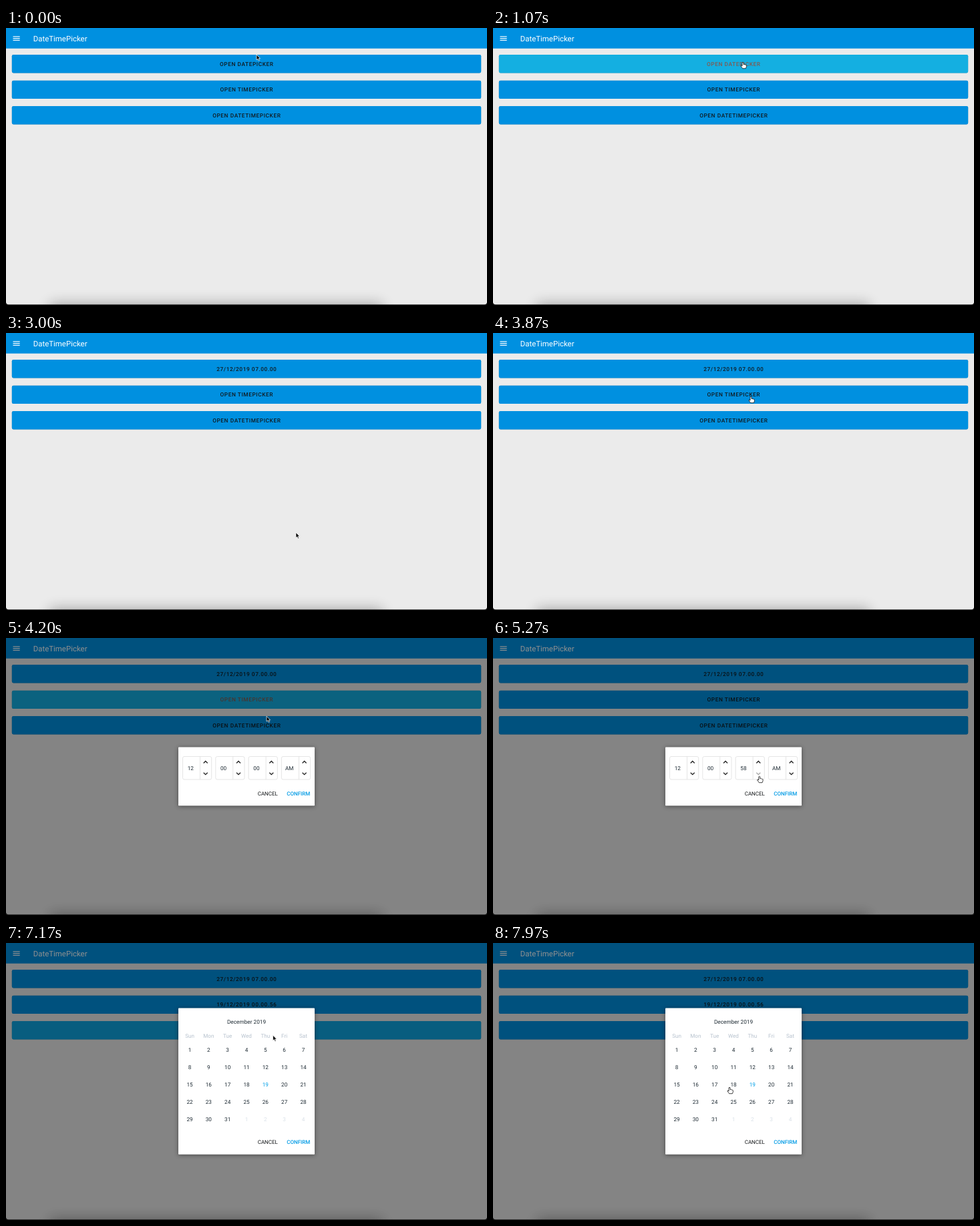
An HTML page for the animation above (8000 ms loop, 720x415 px).

```html
<!DOCTYPE html>
<html lang="en">
<head>
<meta charset="utf-8">
<title>DateTimePicker</title>
<style>
  html, body { margin: 0; width: 100%; height: 100%; overflow: hidden; background: #ebebeb; }
  svg { display: block; width: 100%; height: 100%; }
  text { font-family: Roboto, "Open Sans", sans-serif; text-rendering: geometricPrecision; }
  .raised { filter: drop-shadow(0 .5px .7px rgba(0, 0, 0, .28)); }
  .card { filter: drop-shadow(0 1.5px 3px rgba(0, 0, 0, .45)); }
</style>
</head>
<body>
<svg id="stage" viewBox="0 0 720 415" xmlns="http://www.w3.org/2000/svg">
  <defs><filter id="soft" x="-10%" y="-200%" width="120%" height="500%"><feGaussianBlur stdDeviation="10"/></filter></defs>
</svg>
<script>
const LOOP = 8000;
const BLUE = '#0090e0', INK = '#1d2a33';
const stage = document.getElementById('stage');

function add(parent, tag, attrs) {
  const el = document.createElementNS(stage.namespaceURI, tag);
  for (const key in attrs) el.setAttribute(key, attrs[key]);
  return parent.appendChild(el);
}
const rect = (parent, x, y, width, height, fill, more) =>
  add(parent, 'rect', { x, y, width, height, fill, ...more });

// Text placed by the middle of its capitals.
function label(parent, str, x, y, size, fill, more) {
  const el = add(parent, 'text', {
    x, y: y + size * .355, 'font-size': size, fill, 'text-anchor': 'middle', ...more });
  el.textContent = str;
  return el;
}

// Page
rect(stage, 0, 0, 720, 415, '#ebebeb');
rect(stage, 0, 0, 720, 30.7, BLUE);
for (const y of [12.3, 15.05, 17.8]) rect(stage, 10.5, y, 10.2, 1.15, '#fff');
label(stage, 'DateTimePicker', 40.7, 15.5, 11.45, '#fff', { 'text-anchor': 'start' });

const buttons = [40, 78.7, 117].map(y => {
  const box = rect(stage, 8.8, y, 702.4, 27.4, BLUE, { rx: 2.3, class: 'raised' });
  const text = label(stage, '', 360.3, y + 13.8, 8.3, '#101a20',
    { 'font-weight': 500, 'letter-spacing': .57 });
  return { y, box, text };
});
rect(stage, 66, 413, 497, 26, '#000', { filter: 'url(#soft)', opacity: .3 });
const shade = rect(stage, 0, 0, 720, 415, '#000', { opacity: .44 });
add(stage, 'path', { d: 'M0 410.5Q0 414.2 4 414.2H716Q720 414.2 720 410.5V415H0Z', fill: '#111' });

function dialog(y, height, actionsY) {
  const g = add(stage, 'g', {});
  rect(g, 258, y, 204, height, '#fff', { rx: .8, class: 'card' });
  label(g, 'CANCEL', 391.8, actionsY, 8, '#15181a');
  label(g, 'CONFIRM', 437.8, actionsY, 8, '#009be5', { 'font-weight': 500 });
  return g;
}

// Calendar
const colX = i => 275 + 28.33 * i, rowY = i => 160 + 26 * i;
const calendar = dialog(97.6, 219.2, 298.5);
label(calendar, 'December 2019', 360, 118.5, 8.25, INK);
'Sun Mon Tue Wed Thu Fri Sat'.split(' ').forEach((day, i) =>
  label(calendar, day, colX(i), 139.2, 8.1, '#b6c1cd'));
const picked = add(calendar, 'circle', { cx: colX(5), cy: rowY(3), r: 9, fill: '#00adf5' });
const days = [];
for (let i = 0; i < 35; i++) {
  const fill = i > 30 ? '#d9e1e8' : i === 18 ? '#009fe8' : INK;
  days.push(label(calendar, i % 31 + 1, colX(i % 7), rowY(Math.floor(i / 7)), 8.2, fill));
}

// Clock
const clock = dialog(163.5, 87.7, 233);
const fields = ['12', '00', '00', 'AM'].map((value, i) => {
  const x = 264.5 + 49.3 * i, mid = x + 34.2;
  rect(clock, x, 177.5, 43.2, 34.5, '#fff', { rx: 2.5, stroke: '#dfdfdf', 'stroke-width': .8 });
  rect(clock, x + 25.6, 177.5, .8, 34.5, '#dfdfdf');
  const chevron = (y, dy) => add(clock, 'path', {
    d: `M${mid - 3} ${y - dy}L${mid} ${y + dy}L${mid + 3} ${y - dy}`,
    fill: 'none', stroke: '#222', 'stroke-width': 1.3 });
  chevron(186, -1.5);
  return { text: label(clock, value, x + 11.8, 195, 8.2, INK), down: chevron(203.2, 1.5) };
});

// Pointers, with the tip at the origin
const arrow = add(stage, 'path', {
  d: 'M0 0V7.8L1.8 6.2L3.1 9.1L4.5 8.5L3.2 5.7H5.6Z',
  fill: '#000', stroke: '#fff', 'stroke-width': .7 });
const hand = add(stage, 'path', {
  d: 'M-1 .8Q0-.5 1 .8V3.7Q2 3 2.7 3.9Q3.7 3.4 4.1 4.3Q5.3 4 5.3 5.2V7.2L4.3 9.7H-.4L-3 6Q-3 4.5-1.9 5L-1 6Z',
  fill: '#fff', stroke: '#111', 'stroke-width': .8, 'stroke-linejoin': 'round' });

// Timeline: pointer stops and waypoints as time, x, y
const PATH = [
  [0, 375, 40], [350, 374, 51], [1080, 374, 51], [1870, 416.5, 268], [2080, 417, 240],
  [2240, 417, 240], [2560, 434, 299], [3030, 434, 299], [3330, 388, 108], [3550, 386, 95],
  [4060, 386, 95], [4200, 390, 117], [4620, 398.7, 207], [5780, 398.7, 207], [6050, 434, 234],
  [6240, 434, 234], [6730, 401.7, 139], [6850, 401, 136], [7080, 401, 136],
  [7970, 354, 216], [8000, 354, 216]
];
const DIALOGS = [[1130, 2720, calendar], [4200, 6200, clock], [7080, LOOP, calendar]];
const PRESSES = [960, 4030, 6910];
const STEPS_DOWN = [4980, 5240, 5470, 5700];
const PICK = 2200;

const clamp = v => Math.min(1, Math.max(0, v));
const mix = (a, b, k) => a + (b - a) * k;
const blend = (a, b, k) => `rgb(${a.map((v, i) => Math.round(mix(v, b[i], k)))})`;

// Speed at a waypoint: zero beside a rest, otherwise the mean over both sides.
function speed(i, axis) {
  const a = PATH[i - 1], p = PATH[i], b = PATH[i + 1];
  const rests = q => !q || (q[1] === p[1] && q[2] === p[2]);
  return rests(a) || rests(b) || (p[axis] - a[axis]) * (b[axis] - p[axis]) <= 0
    ? 0 : (b[axis] - a[axis]) / (b[0] - a[0]);
}

function pointerAt(t) {
  const j = PATH.findIndex(p => p[0] > t), i = j - 1;
  const span = PATH[j][0] - PATH[i][0], k = (t - PATH[i][0]) / span;
  return [1, 2].map(axis =>
    mix(PATH[i][axis], PATH[j][axis], k * k * (3 - 2 * k)) +
    span * k * (1 - k) * ((1 - k) * speed(i, axis) - k * speed(j, axis)));
}

function clickable(x, y, open) {
  if (!open) return buttons.some(b => y > b.y + .5 && y < b.y + 27.4);
  const actionY = open === calendar ? 298.5 : 233;
  if (Math.abs(y - actionY) < 9 && x > 372 && x < 460) return true;
  if (open === clock) return y > 177 && y < 212 && fields.some((f, i) => Math.abs(x - 298.7 - 49.3 * i) < 9);
  const col = Math.round((x - 275) / 28.33), row = Math.round((y - 160) / 26);
  return col >= 0 && col < 7 && row >= 0 && row < 5 &&
    Math.hypot(x - colX(col), y - rowY(row)) < 11;
}

const show = (el, on) => el.setAttribute('display', on ? 'inline' : 'none');
const setText = (el, str) => { if (el.textContent !== str) el.textContent = str; };

function draw(t) {
  const current = DIALOGS.find(d => t >= d[0] && t < d[1]);
  const open = current && current[2];
  show(shade, open);
  show(calendar, open === calendar);
  show(clock, open === clock);

  const dateSet = DIALOGS[0][1], timeSet = DIALOGS[1][1];
  setText(buttons[0].text, t < dateSet ? 'OPEN DATEPICKER' : '27/12/2019 07.00.00');
  setText(buttons[1].text, t < timeSet ? 'OPEN TIMEPICKER' : '19/12/2019 00.00.56');
  setText(buttons[2].text, 'OPEN DATETIMEPICKER');
  buttons.forEach((b, i) => {
    const age = t - PRESSES[i];
    const k = clamp(age / 100) * clamp((420 - age) / 220);
    b.box.setAttribute('fill', blend([0, 144, 224], [20, 175, 225], k));
    b.text.setAttribute('fill', blend([16, 26, 32], [130, 90, 80], k));
  });

  const isPicked = t >= PICK && t < dateSet;
  show(picked, isPicked);
  days[26].setAttribute('fill', isPicked ? '#fff' : INK);

  const count = STEPS_DOWN.filter(s => t >= s).length;
  setText(fields[2].text, count ? String(60 - count) : '00');
  const opacity = Math.min(...STEPS_DOWN.map(s =>
    t < s - 80 ? 1 : mix(.25, 1, clamp((t - s) / 150))));
  fields[2].down.setAttribute('opacity', opacity);

  const [x, y] = pointerAt(t), isHand = clickable(x, y, open);
  show(hand, isHand);
  show(arrow, !isHand);
  (isHand ? hand : arrow).setAttribute('transform', `translate(${x} ${y})`);
}

const start = performance.now();
function tick() {
  draw((performance.now() - start) % LOOP);
  requestAnimationFrame(tick);
}
tick();
</script>
</body>
</html>
```
